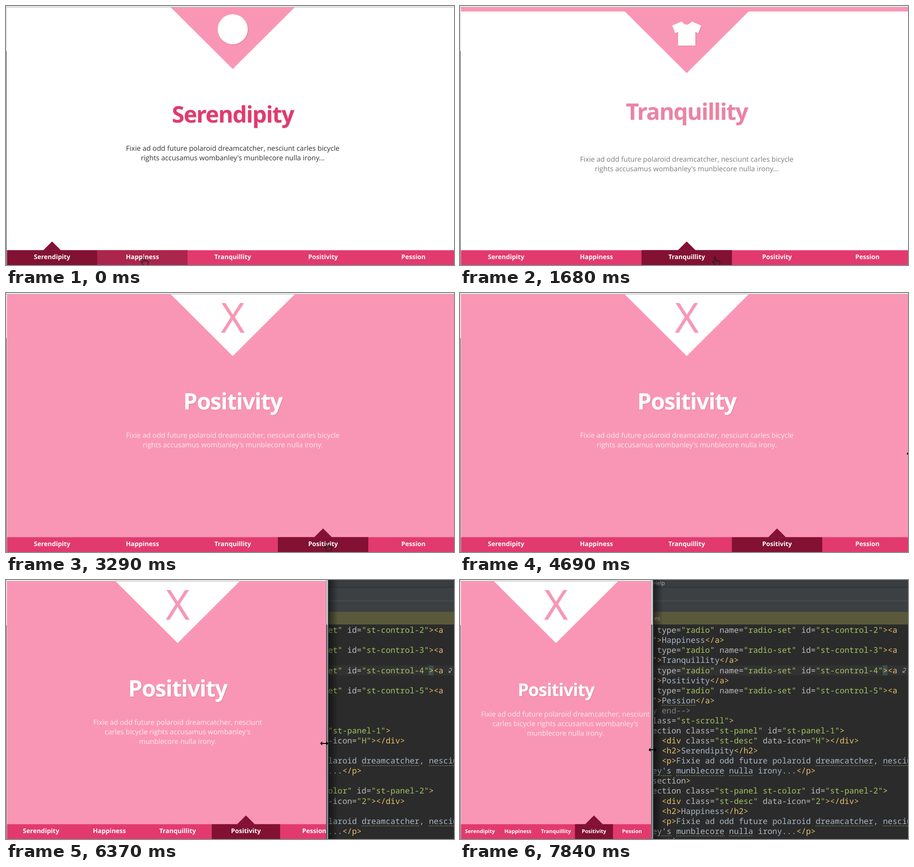
An HTML page that plays this animation: 984 px wide and 569 px high, repeating every 8 s.

```html
<!DOCTYPE html>
<html lang="en">
<head>
<meta charset="utf-8">
<title>Smooth scrolling panels</title>
<style>
  html, body { margin: 0; width: 100%; height: 100%; overflow: hidden; background: #fff; }
  #stage { display: block; width: 984px; height: 569px; }
  text { font-family: "Open Sans", "Noto Sans", sans-serif; text-rendering: geometricPrecision; }
  .mid, .page text { text-anchor: middle; }
  .nav text, .title { font-weight: 700; }
  .nav text { fill: #fff; }
  .title { filter: drop-shadow(1px 1px 1px rgba(0,0,0,.13)); }
  .icon { filter: drop-shadow(1px 1px 1px rgba(0,0,0,.13)); }
  .code text { font: 17.6px "Noto Sans Mono", "DejaVu Sans Mono", monospace; white-space: pre; fill: #a9b7c6; }
  .menu text { font-size: 12px; fill: #bbb; }
</style>
</head>
<body>
<svg id="stage" viewBox="0 0 984 569" width="984" height="569"></svg>
<script>
const LOOP = 8000, STEP = 70;
const PAGE_X = 2, PAGE_Y = 3, PAGE_H = 566, NAV_Y = 533.5;
const PINK = '#fa96b5', RED = '#e23a6e', DARK = '#821134', HOVER = '#ab254c';
const NAMES = ['Serendipity', 'Happiness', 'Tranquillity', 'Positivity', 'Pession'];
const COPY = "Fixie ad odd future polaroid dreamcatcher, nesciunt carles bicycle rights accusamus wombanley's munblecore nulla irony";

const CLICKS = [62, 1134, 2508];
const SCROLL = 600, DELAY = 200, SHIFT = 40;
const LAG = 180;
const RESIZE = 4690;
// [time, value]
const EDGE = [[4690, 994], [5460, 878], [6190, 752], [6300, 720], [6370, 703], [7140, 496], [7650, 419.5]];
const HAND_X = [[210, 302], [280, 357], [420, 470], [490, 505], [1540, 505], [1610, 514], [1680, 560], [1960, 676], [2240, 705]];
const HAND_Y = [[210, 551], [490, 548], [1610, 551], [1960, 549], [2240, 547]];
const ARROW_Y = [[4690, 353], [6370, 359], [7840, 373]];
const ARROW_DX = [[4690, -4], [6370, -4], [7650, 3.5]];

const stage = document.getElementById('stage');
const ctx = document.createElement('canvas').getContext('2d');

function set(node, attrs) {
  for (const k in attrs) node.setAttribute(k, attrs[k]);
  return node;
}
function add(parent, tag, attrs = {}, text) {
  const node = document.createElementNS('http://www.w3.org/2000/svg', tag);
  set(node, attrs);
  if (text !== undefined) node.textContent = text;
  parent.appendChild(node);
  return node;
}
function rect(parent, x, y, width, height, fill) {
  return add(parent, 'rect', { x, y, width, height, fill });
}
function at(keys, t) {
  if (t <= keys[0][0]) return keys[0][1];
  for (let i = 1; i < keys.length; i++) {
    const [t0, a] = keys[i - 1], [t1, b] = keys[i];
    if (t <= t1) return a + (b - a) * (t - t0) / (t1 - t0);
  }
  return keys[keys.length - 1][1];
}
// cubic-bezier(.42, 0, .58, 1)
function ease(x) {
  if (x <= 0) return 0;
  if (x >= 1) return 1;
  let lo = 0, hi = 1, s = 0.5;
  for (let i = 0; i < 24; i++) {
    s = (lo + hi) / 2;
    const bx = 1.26 * (1 - s) * (1 - s) * s + 1.74 * (1 - s) * s * s + s * s * s;
    if (bx < x) lo = s; else hi = s;
  }
  return s * s * (3 - 2 * s);
}
function wrap(text, width) {
  ctx.font = '15.38px "Open Sans", "Noto Sans", sans-serif';
  const lines = [];
  let line = '';
  for (const word of text.split(' ')) {
    const next = line ? line + ' ' + word : word;
    if (line && ctx.measureText(next).width > width + 1) {
      lines.push(line);
      line = word;
    } else line = next;
  }
  return lines.concat(line);
}

// ---- editor behind the window ----
const ROW = 22.08, CELL = 10.56, COL = 422.2;
function colorOf(token, inTag) {
  if (/^["]/.test(token) && inTag) return '#a5c261';
  if (/^[<>\/]/.test(token)) return '#e8bf6a';
  return inTag ? '#bababa' : '#a9b7c6';
}
function codeLine(parent, row, col, src, inTag) {
  const y = 116.2 + row * ROW;
  const text = add(parent, 'text', { x: COL + col * CELL, y });
  for (const token of src.match(/<\/?\w*|\/?>|"[^"<>]*"|"|[^<>"]+/g)) {
    if (token[0] === '<') inTag = true;
    add(text, 'tspan', { fill: colorOf(token, inTag) }, token);
    if (token.endsWith('>')) inTag = false;
  }
  for (const word of ['dreamcatcher', 'nesciunt', 'munblecore', 'nulla', "ey's", 'Pession']) {
    const i = src.indexOf(word);
    if (i < 0) continue;
    const x = COL + (col + i) * CELL;
    add(parent, 'path', { d: `M${x} ${y + 4.5}h${word.length * CELL}`, stroke: '#8a8a6a', 'stroke-width': 1.5, 'stroke-dasharray': '2 2' });
  }
}
function buildEditor() {
  const g = add(stage, 'g', { class: 'menu' });
  rect(g, 0, 0, 984, 569, '#2b2b2b');
  rect(g, 0, 0, 984, 98, '#3c4043');
  rect(g, 0, 0, 984, 16, '#393d40');
  rect(g, 0, 15.5, 984, 1.5, '#2f3235');
  rect(g, 0, 45.5, 984, 1, '#54585a');
  rect(g, 0, 70, 984, 27.5, '#5a593b');
  rect(g, 0, 187.5, 984, 22, '#323232');
  rect(g, 928, 187.5, 11, 22, '#3b514d');
  add(g, 'text', { x: 424, y: 11 }, 'Help');
  add(g, 'text', { x: 427, y: 88 }, 'es');
  const code = add(stage, 'g', { class: 'code' });
  NAMES.slice(1).forEach((name, i) => {
    codeLine(code, i * 2, 1, `type="radio" name="radio-set" id="st-control-${i + 2}"><a`, true);
    codeLine(code, i * 2 + 1, 0, `">${name}</a>`, true);
  });
  add(code, 'text', { x: COL, y: 116.2 + 8 * ROW, style: 'fill:#808080' }, 'y end-->');
  codeLine(code, 9, 0, 'lass="st-scroll">', true);
  [['st-panel', 'H'], ['st-panel st-color', '2']].forEach(([cls, icon], i) => {
    const r = 10 + i * 6;
    codeLine(code, r, 0, `ection class="${cls}" id="st-panel-${i + 1}">`, true);
    codeLine(code, r + 1, 2, `<div class="st-desc" data-icon="${icon}"></div>`);
    codeLine(code, r + 2, 2, `<h2>${NAMES[i]}</h2>`);
    codeLine(code, r + 3, 2, '<p>Fixie ad odd future polaroid dreamcatcher, nesciunt');
    codeLine(code, r + 4, 0, "ey's munblecore nulla irony...</p>");
    codeLine(code, r + 5, 0, 'section>', true);
  });
  add(code, 'path', { d: 'M974 195q5-3 5 1q0 3-6 7h4m-4 0v-4', fill: 'none', stroke: '#b0b0b0', 'stroke-width': 1.2 });
}

// ---- browser window ----
function buildIcon(g, i, color, back) {
  const icon = add(g, 'g', { class: 'icon', fill: color });
  if (i === 0) add(icon, 'circle', { cy: 48, r: 33 });
  if (i === 1) {
    add(icon, 'circle', { cy: 49, r: 31.5 });
    for (const cx of [-10.3, 10.3]) add(icon, 'ellipse', { cx, cy: 37.5, rx: 3.6, ry: 7, fill: back });
    add(icon, 'path', { d: 'M-16 60Q0 69 17 60Q0 81 -16 60Z', fill: back });
  }
  if (i === 2) add(icon, 'path', { d: 'M-11 22Q0 36 11 22L32 31L25 48L19 45V75H-19V45L-25 48L-32 31Z' });
  if (i === 3) add(icon, 'text', { y: 84, 'font-size': 91 }, 'X');
}
function buildPanel(parent, i) {
  const odd = i % 2 === 1;
  const back = odd ? PINK : '#fff', front = odd ? '#fff' : PINK;
  const g = add(parent, 'g');
  rect(g, 0, 0, 1000, PAGE_H + 0.5, back);
  const mid = add(g, 'g');
  add(mid, 'path', { d: 'M-136 0H136L0 135.5Z', fill: front });
  buildIcon(mid, i, odd ? PINK : '#fff', front);
  const title = add(mid, 'text', { class: 'title', fill: odd ? '#fff' : RED }, NAMES[i]);
  const para = add(g, 'text', { 'font-size': 15.38, fill: odd ? 'rgba(255,255,255,.8)' : '#333' });
  return { g, mid, title, para, copy: COPY + (i === 3 ? '.' : '...'), lines: '' };
}

buildEditor();
const defs = add(stage, 'defs');
const grad = add(defs, 'linearGradient', { id: 'shade' });
add(grad, 'stop', { offset: 0, 'stop-color': '#000', 'stop-opacity': 0.5 });
add(grad, 'stop', { offset: 1, 'stop-color': '#000', 'stop-opacity': 0 });

const frame = add(stage, 'g');
rect(frame, 6, 0, 20, 569, 'url(#shade)');
rect(frame, 0, 0, 2, 569, '#4a4a4e');
rect(frame, 2, 0, 2.5, 569, '#9ba3a8');
rect(frame, 0.5, 0, 3, 98, '#d4d6d8');
rect(frame, 4.5, 0, 1.5, 569, '#26282a');

const bar = rect(stage, 0, 0, 984, 2, '#f0f0f0');
const barLine = rect(stage, 0, 2, 984, 1, '#b4b4b4');
rect(stage, 0, 3, 2, 566, '#fff');
rect(stage, 0, 3, 1, 96, '#c4c4c8');
rect(stage, 0, 99, 1, 470, '#2b2b2f');

const page = add(stage, 'svg', { x: PAGE_X, y: PAGE_Y, height: PAGE_H, class: 'page', overflow: 'hidden' });
rect(page, 0, 0, 1000, PAGE_H, '#fff');
const panels = [0, 1, 2, 3].map(i => buildPanel(page, i));
const nav = add(page, 'g', { class: 'nav' });
rect(nav, 0, NAV_Y, 1000, 40, RED);
const hoverBox = rect(nav, 0, NAV_Y, 0, 40, HOVER);
const activeBox = rect(nav, 0, NAV_Y, 0, 40, DARK);
const notch = add(nav, 'path', { d: 'M-19.5 19.5L0 0L19.5 19.5Z', fill: DARK });
const labels = NAMES.map(name => add(nav, 'text', {}, name));

const hand = add(stage, 'path', {
  d: 'M-1.5 13V1.5Q0-1 1.5 1.5V8Q3.5 6 5 8.5Q7 7 8.3 9.5Q11 8.5 11 11.5Q11 15 9 17V19.5H0.5Q-1.5 16-5.5 11.5Q-5.5 8.5-1.5 12M1.5 8V12M5 8.5V12M8.3 9.5V12',
  fill: 'none', stroke: '#1c1c1c', 'stroke-width': 1.2
});
const arrow = add(stage, 'path', { d: 'M-9 0L-4.5-4.5V-1H4.5V-4.5L9 0L4.5 4.5V1H-4.5V4.5Z', fill: '#000' });

function drawPanel(p, i, top, W, small, k) {
  set(p.g, { transform: `translate(0 ${top})` });
  set(p.mid, { transform: `translate(${W / 2} 0)` });
  set(p.title, {
    y: (small ? 251.5 : 253) - SHIFT * (1 - k), opacity: k,
    'font-size': small ? 38.7 : 50, 'letter-spacing': small ? -1.25 : -1.6
  });
  const lines = wrap(p.copy, W * (small ? 0.9 : 0.5));
  if (lines.join('|') !== p.lines) {
    p.lines = lines.join('|');
    p.para.textContent = '';
    lines.forEach((line, n) => add(p.para, 'tspan', { x: 0, y: n * 21 }, line));
  }
  const x = W * (small ? 0.55 : 0.5), y = (small ? 297 : 315) + SHIFT * (1 - k);
  set(p.para, { transform: `translate(${x} ${y})`, opacity: k });
}

function draw(time) {
  const t = Math.floor(time / STEP) * STEP;
  const edge = at(EDGE, t), W = at(EDGE, t - LAG) - PAGE_X;
  const small = W <= 520, tab = W / 5;

  let active = 0, pos = 0;
  const shown = [1, 1, 1, 1];
  CLICKS.forEach((start, n) => {
    const dt = t - start;
    if (dt <= 10) return;
    active = n + 1;
    pos = n + ease(dt / SCROLL);
    shown[active] = ease((dt - DELAY) / SCROLL);
  });
  panels.forEach((p, i) => drawPanel(p, i, (i - pos) * PAGE_H, W, small, shown[i]));

  const resizing = t >= RESIZE;
  const hx = at(HAND_X, t), over = Math.floor((hx - PAGE_X) / tab);
  set(hoverBox, { x: over * tab, width: resizing ? 0 : tab });
  set(activeBox, { x: active * tab, width: tab });
  set(notch, { transform: `translate(${(active + 0.5) * tab} ${NAV_Y - 19.2})` });
  labels.forEach((label, i) => set(label, { x: (i + 0.5) * tab, y: 553.3, 'font-size': small ? 11.5 : 14 }));

  set(page, { width: edge - PAGE_X });
  set(frame, { transform: `translate(${edge} 0)` });
  set(bar, { width: edge });
  set(barLine, { width: edge });
  set(hand, { transform: `translate(${hx} ${at(HAND_Y, t)})`, visibility: resizing ? 'hidden' : 'visible' });
  set(arrow, {
    transform: `translate(${edge + at(ARROW_DX, t)} ${at(ARROW_Y, t)})`,
    visibility: resizing ? 'visible' : 'hidden'
  });
}

const begin = performance.now();
function tick() {
  draw((performance.now() - begin) % LOOP);
  requestAnimationFrame(tick);
}
draw(0);
requestAnimationFrame(tick);
</script>
</body>
</html>
```
